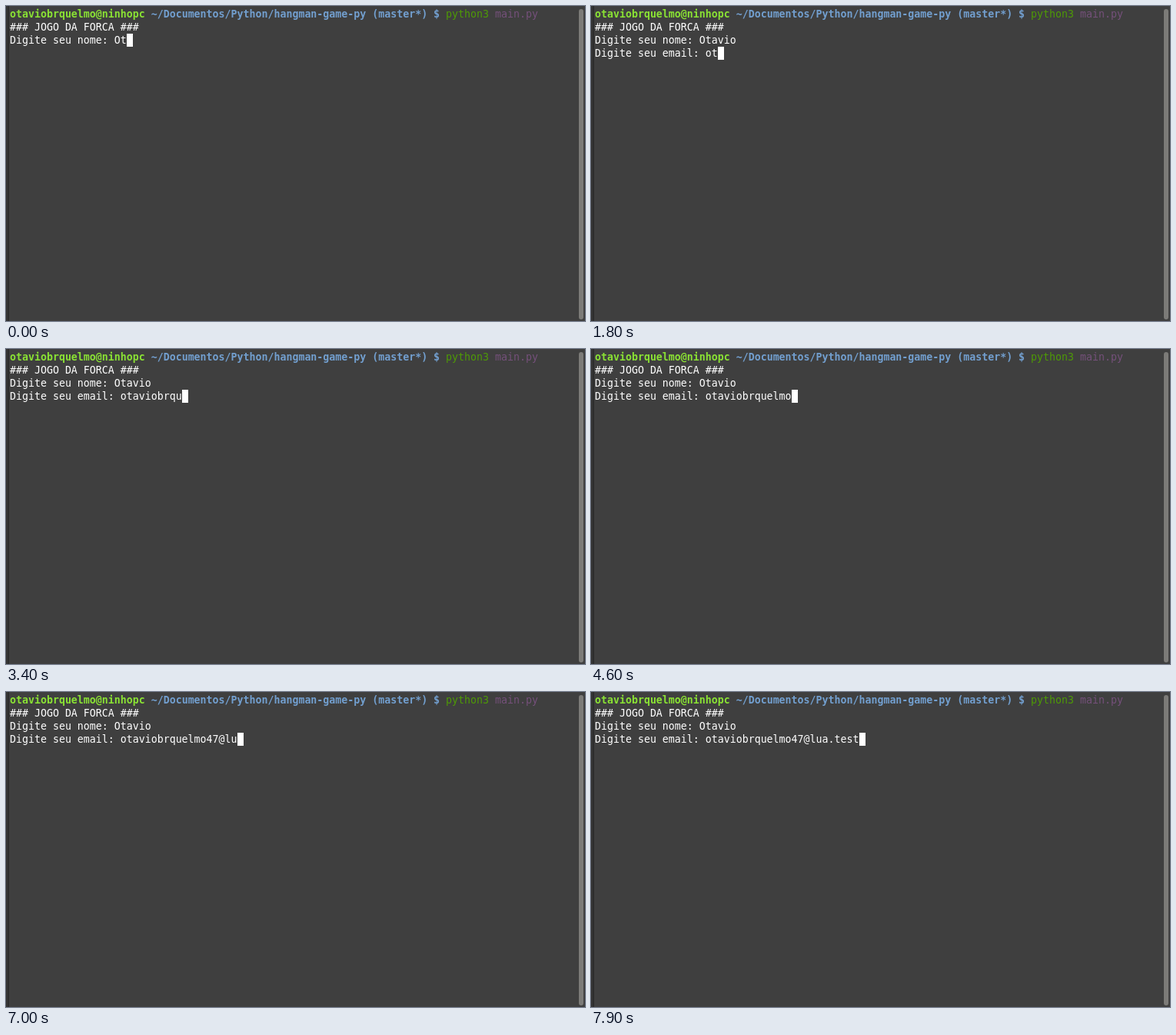
Recreate the animation shown at these times as an HTML page. Size 753 by 410 pixels, loop 8000 ms.

```html
<!DOCTYPE html>
<html lang="pt-BR">
<head>
<meta charset="utf-8">
<title>Jogo da forca</title>
<style>
  html, body { margin: 0; width: 100%; height: 100%; overflow: hidden; background: #3f3f3f; }
  #stage { position: relative; width: 753px; height: 410px; overflow: hidden; background: #3f3f3f; }
  #edge { position: absolute; left: 0; top: 0; width: 3px; height: 410px; background: #333; border-right: 1px solid #282828; }
  #thumb { position: absolute; left: 745px; top: 4px; width: 6px; height: 404px; border-radius: 3px; background: #7c7b78; }
  #screen {
    position: absolute; left: 5px; top: 2px; color: #fff; white-space: pre;
    font: 13.288px/17px "DejaVu Sans Mono", monospace; font-variant-ligatures: none;
  }
  #screen div { height: 17px; }
  #cursor { position: absolute; width: 8px; height: 17px; background: #fff; }
  b { font-weight: 700; }
  .user { color: #8ae234; }
  .path { color: #729fcf; }
  .command { color: #4e9a06; }
  .file { color: #75507b; }
</style>
</head>
<body>
<div id="stage">
  <div id="edge"></div>
  <div id="screen"><div><b class="user">otaviobrquelmo@ninhopc</b> <b class="path">~/Documentos/Python/hangman-game-py (master*) $</b> <span class="command">python3</span> <span class="file">main.py</span></div><div>### JOGO DA FORCA ###</div><div id="name"></div><div id="email"></div><i id="cursor"></i></div>
  <div id="thumb"></div>
</div>
<script>
const LOOP = 8000, CELL = 8, ROW = 17;
const NAME = { row: 2, prompt: 'Digite seu nome: ', text: 'Otavio', typed: 2, keys: [100, 200, 300, 400] };
const EMAIL = {
  row: 3, prompt: 'Digite seu email: ', text: 'otaviobrquelmo47@lua.test', typed: 0,
  keys: [1700, 1800, 1900, 2000, 2100, 2200, 2800, 3100, 3200, 3400, 3500, 4300, 4500,
         4600, 5400, 5800, 6500, 6900, 7000, 7100, 7200, 7300, 7600, 7700, 7900]
};
const ENTER = 900;
const BLINKS = [[1400, 1700], [4100, 4300], [5200, 5400]];

const nameLine = document.getElementById('name');
const emailLine = document.getElementById('email');
const cursor = document.getElementById('cursor');

const lineAt = (field, t) =>
  field.prompt + field.text.slice(0, field.typed + field.keys.filter(key => key <= t).length);

function setText(element, text) {
  if (element.textContent !== text) element.textContent = text;
}

function render(t) {
  const entered = t >= ENTER;
  const field = entered ? EMAIL : NAME;
  setText(nameLine, lineAt(NAME, t));
  setText(emailLine, entered ? lineAt(EMAIL, t) : '');
  cursor.style.left = lineAt(field, t).length * CELL + 'px';
  cursor.style.top = field.row * ROW + 'px';
  cursor.style.visibility = BLINKS.some(([off, on]) => t >= off && t < on) ? 'hidden' : 'visible';
}

const start = performance.now();
function tick() {
  render((performance.now() - start) % LOOP);
  requestAnimationFrame(tick);
}
tick();
</script>
</body>
</html>
```
